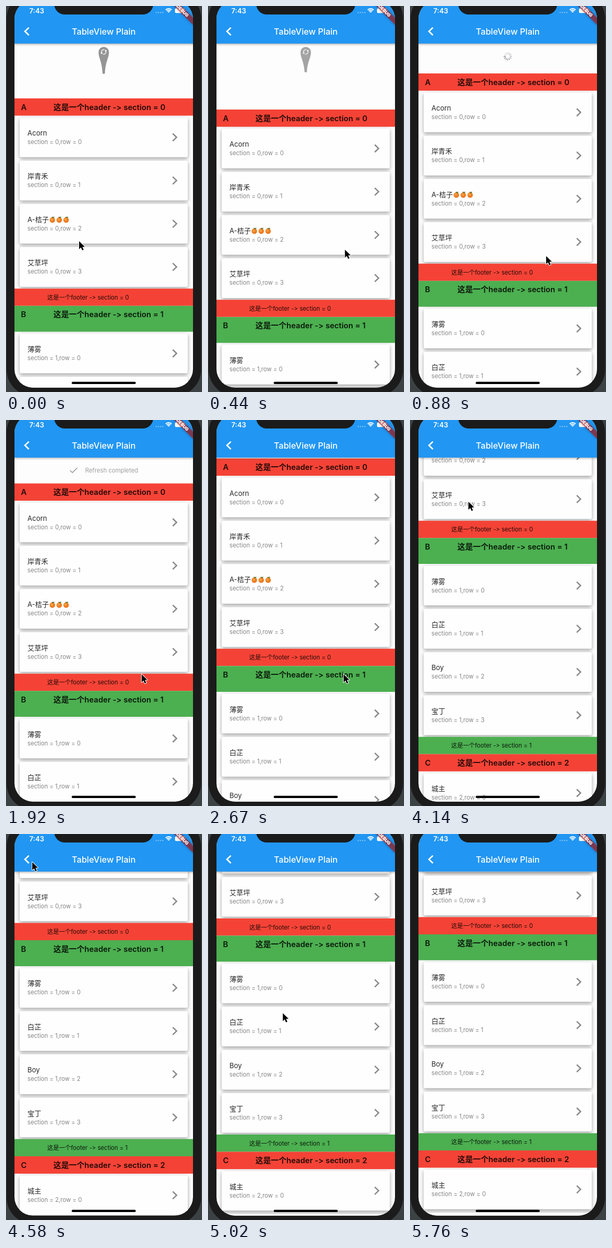
Write an HTML page with a canvas that moves like this. It is 370x727 px and loops after 6.05 s.

```html
<!DOCTYPE html>
<html lang="zh">
<head>
<meta charset="utf-8">
<title>TableView Plain</title>
<style>
html, body { margin: 0; width: 100%; height: 100%; overflow: hidden; background: #3c4244; }
canvas { display: block; width: 370px; height: 727px; }
</style>
</head>
<body>
<canvas id="stage" width="370" height="727"></canvas>
<script>
const ctx = document.getElementById('stage').getContext('2d');
const LOOP = 6050, TICK = 147.6, LEAD = 6;
const U = 337 / 414; // device points to stage pixels
const SCREEN = { x: 16, y: -10.6, w: 337, h: 729.3 };
const BAR_BOTTOM = 70.7, ROW = 100 * U, BAND = 40 * U;
const RED = '#f44336', GREEN = '#4caf50', BLUE = '#2196f3', INK = 'rgba(0,0,0,.85)';
const FONT = 'Inter, "Noto Sans CJK SC", "Noto Sans CJK", sans-serif';

const sections = [
  { letter: 'A', color: RED, header: BAND, rows: ['Acorn', '岸青禾', 'A-桔子', '艾草坪'] },
  { letter: 'B', color: GREEN, header: 60 * U, rows: ['薄雾', '白芷', 'Boy', '宝丁'] },
  { letter: 'C', color: RED, header: BAND, rows: ['城主', 'Cat'] }
];

// Keys are [tick, value, ...]
const scrollKeys = [[0, 174], [1, 197], [2, 204], [3, 195], [4, 161], [5, 139], [6, 127], [7, 121.5],
  [8, 119.5], [16, 119.5], [17, 90], [18, 72.5], [19, 70.9], [20, 70.7]];
const cursorKeys = [[0, 138, 443], [1, 172, 468], [3, 258.5, 459], [8, 256, 479], [21, 256, 479],
  [25, 171, 255], [31, 49.5, 53], [37, 233, 622], [38, 299, 701]];
const dropKeys = [[0, 128, 1], [2, 128, 1], [3, 125, .85], [4, 110, .4], [5, 95, 0]];

function sample(keys, tick) {
  const next = keys.findIndex(key => key[0] > tick);
  if (next < 0) return keys[keys.length - 1].slice(1);
  const a = keys[next - 1], b = keys[next];
  const p = (tick - a[0]) / (b[0] - a[0]);
  return a.slice(1).map((v, i) => v + (b[i + 1] - v) * p);
}

function listTop(tick) {
  if (tick < 22) return sample(scrollKeys, tick)[0];
  // Friction fling that stops once it is slow enough
  const left = 93.7 * Math.exp(-2.16 * (tick - 25) * .148);
  return -204.4 + Math.max(left, 2.7);
}

function box(x, y, w, h, radius, fill) {
  ctx.beginPath();
  ctx.roundRect(x, y, w, h, radius);
  ctx.fillStyle = fill;
  ctx.fill();
}

function text(str, x, middle, size, color, weight = 400, align = 'left') {
  ctx.font = `${weight} ${size}px ${FONT}`;
  ctx.textAlign = align;
  ctx.fillStyle = color;
  // Drawn in two runs so that "->" does not become an arrow ligature
  for (const run of str.split(/(?<=-)(?=>)/)) {
    ctx.fillText(run, x, middle + size * .36);
    x += ctx.measureText(run).width;
  }
}

function line(points, width, color) {
  ctx.beginPath();
  points.forEach(([x, y]) => ctx.lineTo(x, y));
  ctx.lineWidth = width;
  ctx.strokeStyle = color;
  ctx.stroke();
}

function disc(x, y, r, color) {
  ctx.beginPath();
  ctx.arc(x, y, r, 0, Math.PI * 2);
  ctx.fillStyle = color;
  ctx.fill();
}

function shadow(color, blur, dy) {
  ctx.shadowColor = color;
  ctx.shadowBlur = blur;
  ctx.shadowOffsetY = dy;
}

function tangerine(x, y) {
  disc(x, y + .9, 5.2, '#ea7d22');
  disc(x - 1, y - .2, 2.6, '#f79a3c');
  ctx.beginPath();
  ctx.ellipse(x + 1.8, y - 4, 2.3, 1.1, -.4, 0, Math.PI * 2);
  ctx.fillStyle = '#5b7a2c';
  ctx.fill();
  line([[x, y - 3], [x - .4, y - 5.6]], 1, '#6b4a22');
}

function drawRow(name, section, index, y) {
  ctx.save();
  shadow('rgba(0,0,0,.38)', 7, 2.4);
  box(25.8, y + 3.3, 317.4, ROW - 6.5, 3, '#fefefe');
  ctx.restore();
  text(name, 40.5, y + 32.8, 13, INK);
  if (section === 0 && index === 2) [87.5, 100.5, 113.5].forEach(x => tangerine(x, y + 32.8));
  text(`section = ${section},row = ${index}`, 40.5, y + 49.5, 11.2, '#858585');
  const c = y + ROW / 2;
  line([[314.8, c - 7], [322, c], [314.8, c + 7]], 2.5, '#8a8a8a');
}

function drawList(y) {
  sections.forEach((s, i) => {
    box(16, y, 337, s.header, 0, s.color);
    text(s.letter, 28.3, y + 16.5, 14.65, INK, 600);
    text(`这是一个header -> section = ${i}`, 89.5, y + 16.5, 14.65, INK, 600);
    y += s.header;
    s.rows.forEach((name, j) => {
      if (y > -ROW && y < 727) drawRow(name, i, j, y);
      y += ROW;
    });
    box(16, y, 337, BAND, 0, s.color);
    text(`这是一个footer -> section = ${i}`, 77.8, y + 16.5, 11.2, INK);
    y += BAND;
  });
}

function drawDrop(tip, alpha) {
  const x = 184.5, y = 86.8, r = 9.8;
  ctx.save();
  ctx.globalAlpha = alpha;
  ctx.beginPath();
  ctx.arc(x, y, r, Math.PI, 0);
  ctx.bezierCurveTo(x + r, y + 12, x + 3.5, y + 16, x + 2.2, tip - 1);
  ctx.quadraticCurveTo(x, tip + 1, x - 2.2, tip - 1);
  ctx.bezierCurveTo(x - 3.5, y + 16, x - r, y + 12, x - r, y);
  ctx.fillStyle = '#959595';
  ctx.fill();
  // Two circling arrows
  for (const turn of [0, Math.PI]) {
    ctx.save();
    ctx.translate(x, y - .3);
    ctx.rotate(turn - .6);
    ctx.beginPath();
    ctx.arc(0, 0, 4.3, .2, 2.5);
    ctx.lineWidth = 1.3;
    ctx.strokeStyle = '#fff';
    ctx.stroke();
    ctx.beginPath();
    ctx.moveTo(2, 1.2);
    ctx.lineTo(6.6, 1.6);
    ctx.lineTo(4.6, -1.8);
    ctx.fillStyle = '#fff';
    ctx.fill();
    ctx.restore();
  }
  ctx.restore();
}

function drawSpinner(y, tick) {
  for (let i = 0; i < 12; i++) {
    ctx.save();
    ctx.translate(184.5, y);
    ctx.rotate((i + Math.floor(tick * 1.776)) * Math.PI / 6);
    box(-.8, -8, 1.6, 4.2, .8, `rgba(120,120,130,${.2 + i * .055})`);
    ctx.restore();
  }
}

function drawRefresh(tick, top) {
  const y = Math.min(94.9, top - 24.7);
  if (tick < 5) drawDrop(...sample(dropKeys, tick));
  else if (tick < 13) drawSpinner(y, tick);
  else if (tick < 20) {
    line([[121, y + .2], [125.3, y + 4.3], [134.6, y - 4.8]], 1.6, '#9a9a9a');
    text('Refresh completed', 149.5, y, 11.2, '#9e9e9e');
  }
}

function drawAppBar() {
  ctx.save();
  shadow('rgba(0,0,0,.4)', 5, 1.5);
  box(10, -20, 349, BAR_BOTTOM + 20, 0, BLUE);
  ctx.restore();
  line([[43.2, 40.6], [35.8, 47.8], [43.2, 55]], 2.7, '#fff');
  text('TableView Plain', 184.5, 47.8, 16.1, '#fff', 500, 'center');

  text('7:43', 44, 9.3, 13, '#fff', 600);
  for (let i = 0; i < 4; i++) disc(283.5 + i * 4.2, 12.3, 1.2, 'rgba(255,255,255,.4)');
  for (const r of [2, 5, 8]) {
    ctx.beginPath();
    ctx.arc(307, 13, r, -Math.PI * .75, -Math.PI * .25);
    ctx.lineWidth = 2;
    ctx.strokeStyle = '#fff';
    ctx.stroke();
  }
  box(319, 4.3, 18.5, 9, 2.5, '#fff');
  box(338.5, 7.3, 1.3, 3, .6, 'rgba(255,255,255,.6)');
}

function drawBanner() {
  ctx.save();
  ctx.translate(SCREEN.x + SCREEN.w, SCREEN.y);
  ctx.scale(U, U);
  ctx.rotate(Math.PI / 4);
  ctx.save();
  shadow('rgba(0,0,0,.5)', 5, 0);
  box(-40, 28, 80, 12, 0, 'rgba(183,28,28,.63)');
  ctx.restore();
  text('DEBUG', 0, 34, 10.2, '#fff', 900, 'center');
  ctx.restore();
}

function drawCursor(x, y) {
  ctx.save();
  ctx.translate(x, y);
  ctx.beginPath();
  [[0, 0], [0, 15], [3.5, 11.8], [6, 17.2], [8.6, 16], [6.2, 10.8], [10.8, 10.6]].forEach(p => ctx.lineTo(...p));
  ctx.closePath();
  ctx.lineJoin = 'round';
  ctx.lineWidth = 2;
  ctx.strokeStyle = '#fff';
  ctx.stroke();
  ctx.fillStyle = '#000';
  ctx.fill();
  ctx.restore();
}

function draw(now) {
  const tick = Math.min(40, Math.floor((now % LOOP + LEAD) / TICK));
  const top = listTop(tick);

  ctx.fillStyle = '#3c4244';
  ctx.fillRect(0, 0, 370, 727);
  box(1, -27, 367.5, 762, 51, '#1b1b1b');

  ctx.save();
  ctx.beginPath();
  ctx.roundRect(SCREEN.x, SCREEN.y, SCREEN.w, SCREEN.h, 35);
  ctx.clip();
  ctx.fillStyle = '#fdfdfd';
  ctx.fillRect(0, 0, 370, 727);
  drawRefresh(tick, top);
  drawList(top);
  drawAppBar();
  drawBanner();
  box(124, 707.8, 121, 4.2, 2.1, '#000');
  if (tick < 39) drawCursor(...sample(cursorKeys, tick));
  ctx.restore();

  box(91, -30, 187, 46, [0, 0, 20, 20], '#1b1b1b');
}

const start = performance.now();
function loop() {
  draw(performance.now() - start);
  requestAnimationFrame(loop);
}
loop();
</script>
</body>
</html>
```
